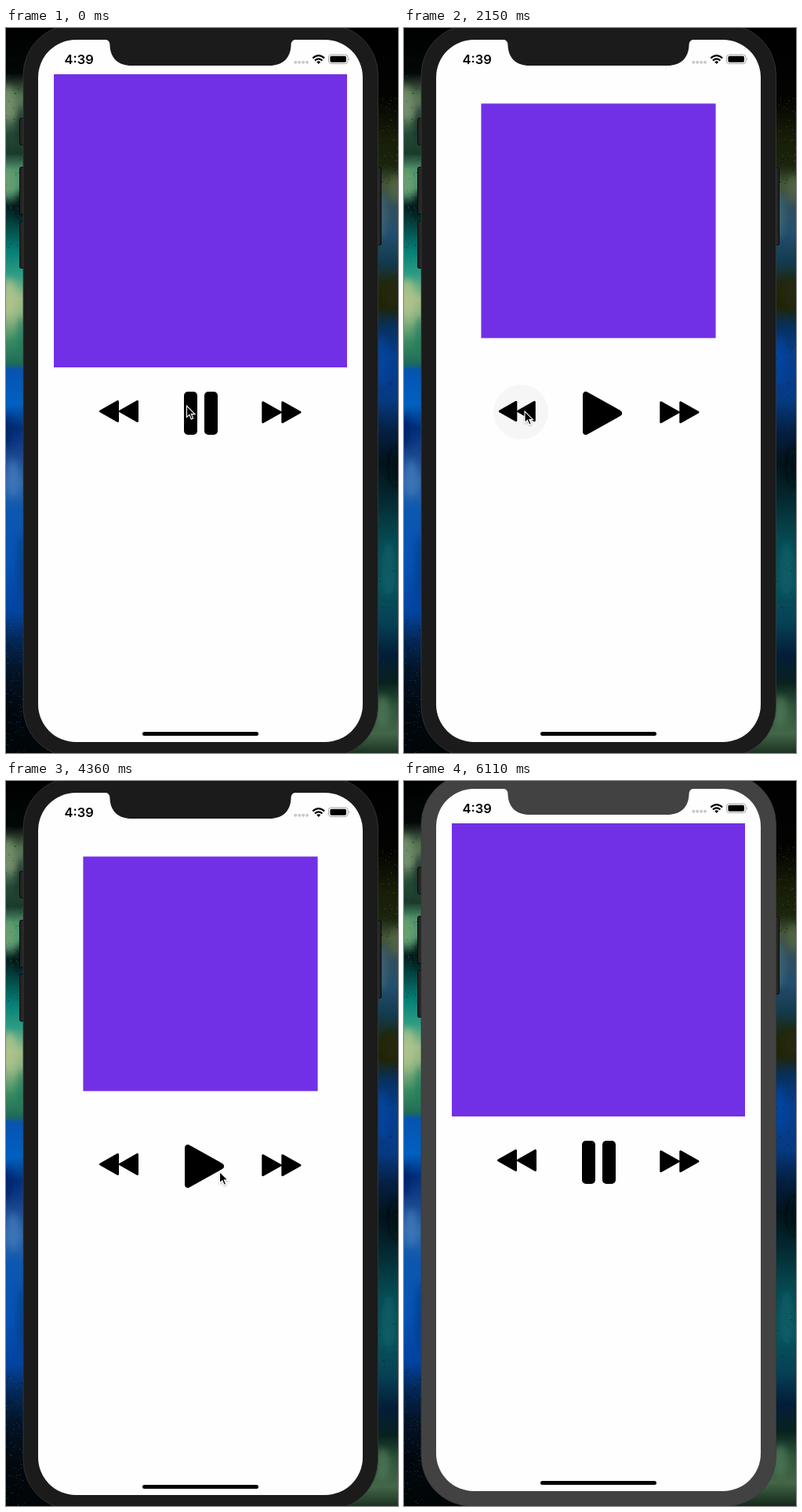
An HTML page that plays this animation: 500x925 px, repeating every 6.55 s.

```html
<!DOCTYPE html>
<html lang="en">
<head>
<meta charset="utf-8">
<title>Music player</title>
<style>
html, body { margin: 0; width: 100%; height: 100%; overflow: hidden; background: #000; }
svg { display: block; width: 500px; height: 925px; }
text { font: 600 16.5px Inter, "Liberation Sans", sans-serif; }
</style>
</head>
<body>
<svg viewBox="0 0 500 925" xmlns="http://www.w3.org/2000/svg">
  <defs>
    <linearGradient id="leftSky" x2="0" y2="1"></linearGradient>
    <linearGradient id="rightSky" x2="0" y2="1"></linearGradient>
    <filter id="cloud" x="-50%" y="-50%" width="200%" height="200%"><feGaussianBlur stdDeviation="4"/></filter>
    <filter id="shadow" x="-60%" y="-60%" width="220%" height="220%">
      <feDropShadow dx="0" dy="1" stdDeviation="0.8" flood-opacity=".35"/>
    </filter>
    <clipPath id="stage"><rect width="500" height="930"/></clipPath>
  </defs>
  <g id="scene">
    <g clip-path="url(#stage)">
      <rect width="250" height="930" fill="url(#leftSky)"/>
      <rect x="250" width="250" height="930" fill="url(#rightSky)"/>
      <g id="clouds" filter="url(#cloud)"></g>
      <g id="specks"></g>
    </g>

    <g fill="#242424" stroke="#080808">
      <rect x="17.5" y="115" width="8" height="34" rx="2"/>
      <rect x="17.5" y="177.500" width="8" height="60" rx="2"/>
      <rect x="17.5" y="246.500" width="8" height="60" rx="2"/>
      <rect x="470.500" y="178" width="8" height="99" rx="2"/>
    </g>
    <rect id="body" x="22" y="-4" width="452.500" height="934" rx="64" stroke="#3a3a3a" stroke-width=".8"/>
    <rect x="41" y="15" width="414" height="896" rx="48" fill="#fefefe"/>
    <path id="notch" d="M126 14.500Q132.500 15 132.500 22C133 39 144 48 160 48H336C352 48 363 39 363.500 22Q363.500 15 370 14.500Z"/>

    <text x="74.500" y="45.700">4:39</text>
    <g fill="#c9c9cb">
      <circle cx="369.300" cy="43.700" r="2"/><circle cx="374.200" cy="43.700" r="2"/>
      <circle cx="379.100" cy="43.700" r="2"/><circle cx="384" cy="43.700" r="2"/>
    </g>
    <g fill="none" stroke="#000" stroke-width="2.300">
      <path d="M391.300 38.500Q398.700 31.700 406.100 38.500"/>
      <path d="M394 41.500Q398.700 37.300 403.400 41.500"/>
    </g>
    <path d="M396.200 43.300Q398.700 41.300 401.200 43.300L398.700 45.900Z"/>
    <rect x="411.500" y="34" width="24.500" height="11.500" rx="3.200" fill="none" stroke="#a4a4a4"/>
    <rect x="413.400" y="35.800" width="20.600" height="8" rx="1.700"/>
    <path d="M437 37.800Q438.800 39.700 437 41.700Z" fill="#999"/>

    <rect id="cover" x="-187" y="-187" width="374" height="374" fill="#7230e6"/>
    <g id="rings" fill="#aaa"></g>
    <g id="icons" stroke="#000" stroke-linejoin="round">
      <g stroke-width="3">
        <path d="M120.500 489L142.500 476.500V501.500ZM145.500 489L167.500 476.500V501.500Z"/>
      </g>
      <g>
        <path id="play" stroke-width="8" d="M232 468V515L274 491.500Z"/>
        <g id="pause" stroke="none">
          <rect x="227" y="464" width="17" height="55" rx="5"/>
          <rect x="253" y="464" width="17" height="55" rx="5"/>
        </g>
      </g>
      <g stroke-width="3">
        <path d="M375 490.200L352.800 477.700V502.700ZM350 490.200L327.800 477.700V502.700Z"/>
      </g>
    </g>
    <rect x="174" y="898" width="148" height="5" rx="2.500"/>
    <path id="cursor" d="M0 0V14.500L3.400 11.400L5.800 17L8.200 16L5.900 10.600H10.500Z"
      stroke="#fff" stroke-width="1.100" filter="url(#shadow)"/>
  </g>
</svg>
<script>
const LOOP = 6550, FADE = 250;
const $ = id => document.getElementById(id);

function add(parent, tag, attrs) {
  const el = document.createElementNS("http://www.w3.org/2000/svg", tag);
  for (const key in attrs) el.setAttribute(key, attrs[key]);
  return parent.appendChild(el);
}

// Wallpaper: vertical colour bands, soft clouds and powder grains.
const bands = (id, text) => text.split(" ").forEach(stop => {
  const [y, color] = stop.split("#");
  add($(id), "stop", { offset: y / 930, "stop-color": "#" + color });
});
bands("leftSky", "0#000000 58#020806 85#526f50 110#648466 135#254a35 160#193a2c 180#4f9168 205#4a9277 228#06201e 255#034b48 285#058078 315#2f9d83 345#9dbb86 375#86b080 400#3c8b62 428#206b58 436#0754b0 480#0060c0 510#022f78 535#123f88 580#3168ac 615#0d57ae 680#0754b5 745#0343a0 780#032858 820#031326 870#02080e 930#010506");
bands("rightSky", "0#000000 90#030402 140#171d08 175#1b240d 200#44583a 225#344f5c 260#254f70 300#123a4d 325#202910 355#222506 380#07305c 420#073f91 475#063a82 515#041f40 555#03131c 600#04282f 650#064850 710#08545c 760#064054 800#031d38 835#08211e 865#2d5438 900#436747 930#14281b");

let seed = 7;
const random = () => (seed = seed * 16807 % 2147483647) / 2147483647;

for (const [x, y, rx, ry, fill] of [
  [2, 95, 9, 22, "#7b956f"], [19, 120, 7, 22, "#12291f"], [3, 198, 10, 18, "#70a36d"],
  [20, 225, 8, 20, "#031412"], [4, 345, 11, 25, "#b2c58e"], [20, 395, 6, 28, "#1d795c"],
  [0, 515, 9, 20, "#02236a"], [9, 575, 8, 24, "#417bbb"], [20, 690, 6, 45, "#053c8b"],
  [478, 240, 8, 28, "#3d6774"], [497, 205, 7, 18, "#576a43"], [494, 340, 10, 18, "#25290a"],
  [479, 425, 7, 32, "#0648a5"], [497, 560, 8, 25, "#020b0f"], [488, 690, 9, 35, "#0a6068"],
  [480, 872, 9, 20, "#50785a"]
]) add($("clouds"), "ellipse", { cx: x, cy: y, rx, ry, fill, opacity: .75 });

function grains(count, x, y, height, colors) {
  for (let i = 0; i < count; i++) add($("specks"), "rect", {
    x: x + Math.floor(random() * 25), y: y + Math.floor(random() * height),
    width: 1, height: 1, fill: colors[i % colors.length], opacity: .35 + random() * .5
  });
}
grains(90, 0, 40, 260, ["#0b1712", "#315c48", "#08766b"]);
grains(170, 0, 750, 180, ["#07549b", "#03223f", "#000", "#246b69"]);
grains(120, 475, 85, 115, ["#55601f", "#23290c", "#000"]);
grains(100, 475, 310, 540, ["#031923", "#07545b", "#04152c"]);

// Each button: centre and its [press, release] times.
const buttons = [
  { x: 149, y: 490, clicks: [[1280, 1730], [2060, 2440]] },
  { x: 248, y: 490, clicks: [[470, 800], [4440, 4690]] },
  { x: 347, y: 490, clicks: [[3090, 3510], [3800, 4080]] }
];
buttons.forEach((button, i) => {
  button.icon = $("icons").children[i];
  button.ring = add($("rings"), "circle", { r: 35 });
});

// Cursor stops: time, x, y.
const path = [
  [0, 230.5, 482], [850, 230.5, 482], [1190, 166, 485.5], [1270, 154, 489],
  [2450, 154, 489], [2740, 393, 516], [2880, 371.5, 503.5], [3090, 360, 495],
  [4080, 360, 495], [4360, 272.5, 498.5], [4440, 254.5, 497], [4960, 254.5, 497],
  [5470, 270, 870], [5650, 274, 945], [LOOP, 274, 945]
];

const ramp = (t, start, length) => {
  const p = Math.min(1, Math.max(0, (t - start) / length));
  return p * p * (3 - 2 * p);
};
const mix = (a, b, p) => a + (b - a) * p;
const scaleAt = (x, y, s) => `translate(${x} ${y}) scale(${s}) translate(${-x} ${-y})`;

function drawButton({ x, y, clicks, icon, ring }, t) {
  let level = 0, spread = 0;
  for (const [down, up] of clicks) {
    const out = ramp(t, up, FADE);
    level += ramp(t, down, FADE) * (1 - out);
    if (t >= down) spread = out;
  }
  icon.setAttribute("transform", scaleAt(x, y, 1 - .2 * level));
  ring.setAttribute("transform", `translate(${x} ${y}) scale(${1 + .1 * spread})`);
  ring.setAttribute("opacity", .3 * level);
}

function draw(t) {
  buttons.forEach(button => drawButton(button, t));

  const [[, stop], [, start]] = buttons[1].clicks;
  const size = 1 - .2 * (ramp(t, stop, FADE) - ramp(t, start, FADE));
  $("cover").setAttribute("transform", `translate(248 246) scale(${size})`);
  const paused = t >= stop && t < start;
  $("play").style.display = paused ? "" : "none";
  $("pause").style.display = paused ? "none" : "";

  const next = path.findIndex(point => point[0] > t);
  const [t0, x0, y0] = path[next - 1], [t1, x1, y1] = path[next];
  const p = ramp(t, t0, t1 - t0);
  $("cursor").setAttribute("transform", `translate(${mix(x0, x1, p)} ${mix(y0, y1, p)})`);

  const lift = ramp(t, 5985, 125);
  const shade = Math.round(mix(27, 66, lift));
  $("scene").setAttribute("transform", `translate(0 ${-5 * lift})`);
  for (const id of ["body", "notch"]) $(id).setAttribute("fill", `rgb(${shade},${shade},${shade})`);
}

const begin = performance.now();
function tick() {
  draw((performance.now() - begin) % LOOP);
  requestAnimationFrame(tick);
}
draw(0);
requestAnimationFrame(tick);
</script>
</body>
</html>
```
